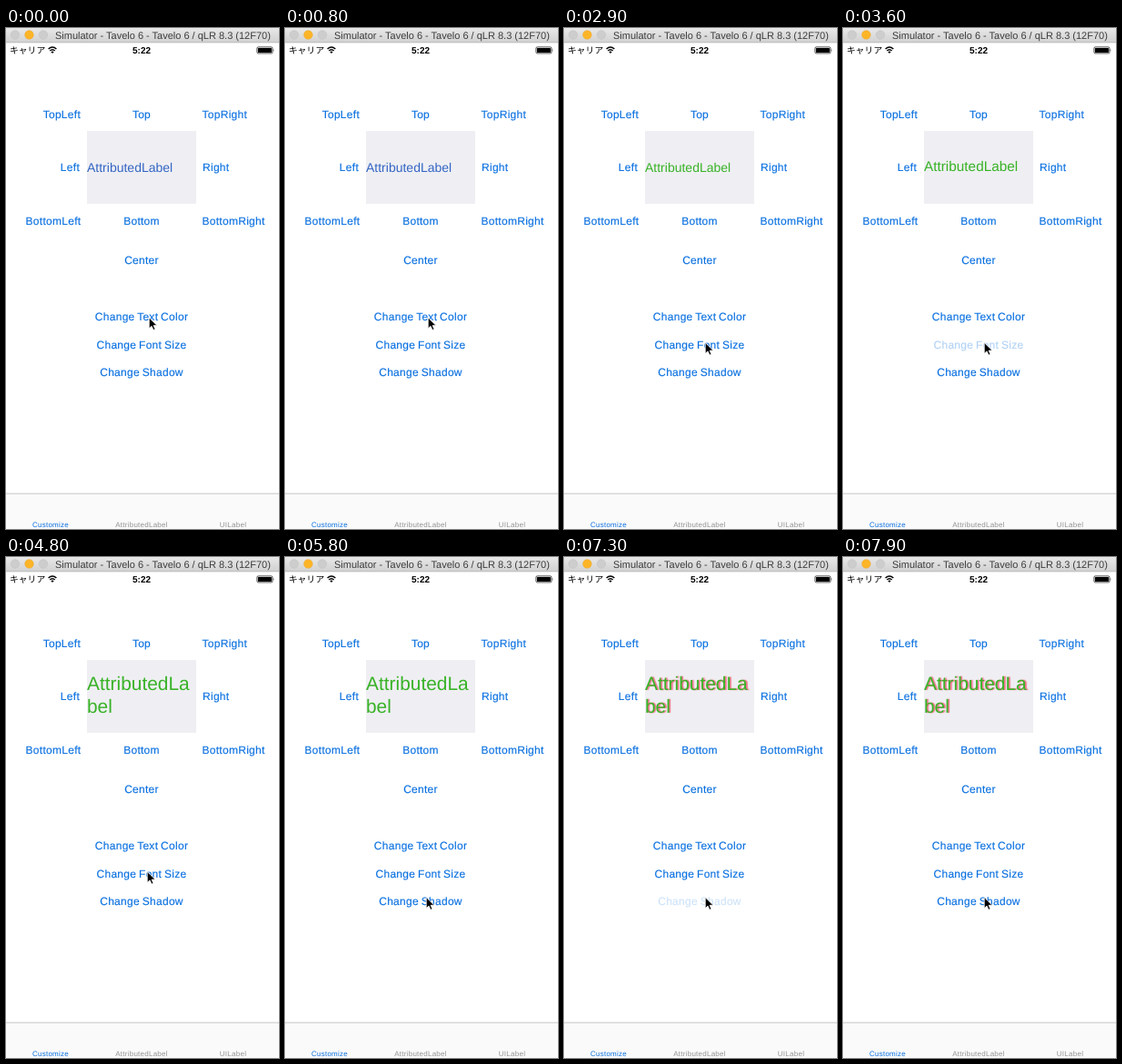
Animation, 300 px wide and 550 px high, one loop 8 s. Source, as an HTML page:

```html
<!DOCTYPE html>
<html lang="en">
<head>
<meta charset="utf-8">
<title>Label simulator</title>
<style>
  html, body { margin: 0; width: 100%; height: 100%; overflow: hidden; background: #fff; }
  body {
    position: relative; font-family: "Liberation Sans", Arial, sans-serif;
    text-rendering: geometricPrecision;
  }
  svg { position: absolute; left: 0; top: 0; display: block; }
  #label {
    position: absolute; left: 89px; top: 112.5px; width: 120px; height: 80px;
    display: flex; align-items: center; background: #efeff3;
    line-height: 1.18; word-break: break-all;
  }
  #label span { position: relative; top: .4px; width: 120px; }
  .button {
    font-size: 12px; letter-spacing: .28px; word-spacing: -.8px;
    fill: #0a70e0; stroke: #0a70e0; stroke-width: .15px;
  }
  .tab { font-size: 8px; letter-spacing: .25px; text-anchor: middle; fill: #929292; }
  .carrier { font: 9.8px "Noto Sans CJK JP", "Noto Sans CJK", sans-serif; }
  .clock { font-size: 10px; font-weight: bold; text-anchor: middle; }
</style>
</head>
<body>
<svg width="300" height="550" viewBox="0 0 300 550">
  <defs>
    <linearGradient id="bar" x2="0" y2="1">
      <stop stop-color="#e8e8e8"/><stop offset="1" stop-color="#d1d1d1"/>
    </linearGradient>
  </defs>
  <rect width="300" height="16" fill="url(#bar)"/>
  <rect y="15.5" width="300" height=".8" fill="#b4b4b4"/>
  <g stroke-width=".5">
    <circle cx="10" cy="7.5" r="4.8" fill="#cdcdcd" stroke="#c0c0c0"/>
    <circle cx="25.5" cy="7.5" r="4.8" fill="#fdb528" stroke="#e8a628"/>
    <circle cx="41" cy="7.5" r="4.8" fill="#cdcdcd" stroke="#c0c0c0"/>
  </g>
  <text x="54" y="12" font-size="11" fill="#3c3c3c">Simulator - Tavelo 6 - Tavelo 6 / qLR 8.3 (12F70)</text>

  <text class="carrier" x="4" y="27.8">キャリア</text>
  <g fill="none" stroke="#000" stroke-width="1.4">
    <path d="M46.6 23.1Q51 18.7 55.4 23.1M48.3 25Q51 22.3 53.7 25"/>
    <path d="M49.4 26.2Q51 24.9 52.6 26.2L51 27.9Z" fill="#000" stroke="none"/>
  </g>
  <text class="clock" x="149" y="28">5:22</text>
  <rect x="275.9" y="20.9" width="17" height="7" rx="1.3" fill="none" stroke="#000" stroke-width=".7"/>
  <rect x="276.9" y="21.9" width="15" height="5" rx=".5"/>
  <path d="M293.7 23q1.2 1.4 0 2.8z"/>

  <g id="buttons"></g>

  <rect y="511" width="300" height="39" fill="#fafafa"/>
  <rect y="510.7" width="300" height=".8" fill="#b8b8b8"/>
  <text class="tab" x="49" y="548" style="fill:#0a70e0">Customize</text>
  <text class="tab" x="149" y="548">AttributedLabel</text>
  <text class="tab" x="249.5" y="548">UILabel</text>
</svg>
<div id="label"><span>AttributedLabel</span></div>
<svg width="300" height="550" viewBox="0 0 300 550">
  <path id="cursor" d="M0 0V11.8L2.8 9.3 4.7 13.5 6.6 12.7 4.8 8.6H8.6Z" stroke="#fff" stroke-width=".7"/>
</svg>
<script>
const LOOP = 8000, STEP = 100, PRESS = 140, FADE = 350;

// text, x, baseline, anchor, release times
const BUTTONS = [
  ["TopLeft", 82, 98.5, "end"], ["Top", 149, 98.5, "middle"], ["TopRight", 215.5, 98.5, "start"],
  ["Left", 81, 157.3, "end"], ["Right", 216, 157.3, "start"],
  ["BottomLeft", 82.4, 215.6, "end"], ["Bottom", 149, 215.6, "middle"], ["BottomRight", 215.5, 215.6, "start"],
  ["Center", 149, 258.7, "middle"],
  ["Change Text Color", 149, 321.3, "middle", [1300, 2080]],
  ["Change Font Size", 149, 351.8, "middle", [3550, 3850, 4150, 4450]],
  ["Change Shadow", 149, 382.2, "middle", [6670, 7300]]
];
const COLORS = [[0, "#3465c4"], [1300, "#cb2c82"], [2080, "#38b226"]];
const SIZES = [[0, 14], [3550, 15.35], [3850, 17.1], [4150, 18.8], [4450, 20.9]];
const SHADOWS = [[0, "none"], [6670, "2px 3.2px 1px #3a70e0"], [7300, "1.6px 0 1.2px #f0607c"]];
// time, x, y
const PATH = [[0, 157.3, 318], [2300, 157.3, 318], [2700, 155.3, 345.5],
              [5100, 155.3, 345.5], [5600, 155.3, 373.7], [LOOP, 155.3, 373.7]];

const $ = id => document.getElementById(id);
const label = $("label"), cursor = $("cursor");

const buttons = BUTTONS.map(([text, x, y, anchor, taps]) => {
  const el = document.createElementNS("http://www.w3.org/2000/svg", "text");
  el.setAttribute("class", "button");
  el.setAttribute("x", x);
  el.setAttribute("y", y);
  el.setAttribute("text-anchor", anchor);
  el.textContent = text;
  $("buttons").append(el);
  return { el, taps };
}).filter(b => b.taps);

const valueAt = (steps, t) => steps.filter(s => s[0] <= t).pop()[1];

function opacityAt(taps, t) {
  return Math.min(...taps.map(tap => {
    if (t < tap - PRESS) return 1;
    return Math.min(1, 0.2 + 0.8 * Math.max(0, t - tap) / FADE);
  }));
}

function cursorAt(t) {
  const i = PATH.findIndex(p => p[0] > t);
  const [t0, x0, y0] = PATH[i - 1], [t1, x1, y1] = PATH[i];
  const p = (t - t0) / (t1 - t0), k = p * p * (3 - 2 * p);
  return [x0 + (x1 - x0) * k, y0 + (y1 - y0) * k];
}

function draw(now) {
  const t = Math.floor((now % LOOP) / STEP) * STEP;
  label.style.color = valueAt(COLORS, t);
  label.style.fontSize = valueAt(SIZES, t) + "px";
  label.style.textShadow = valueAt(SHADOWS, t);
  buttons.forEach(b => b.el.setAttribute("opacity", opacityAt(b.taps, t)));
  cursor.setAttribute("transform", `translate(${cursorAt(t)})`);
}

const start = performance.now();
function tick() {
  draw(performance.now() - start);
  requestAnimationFrame(tick);
}
tick();
</script>
</body>
</html>
```
